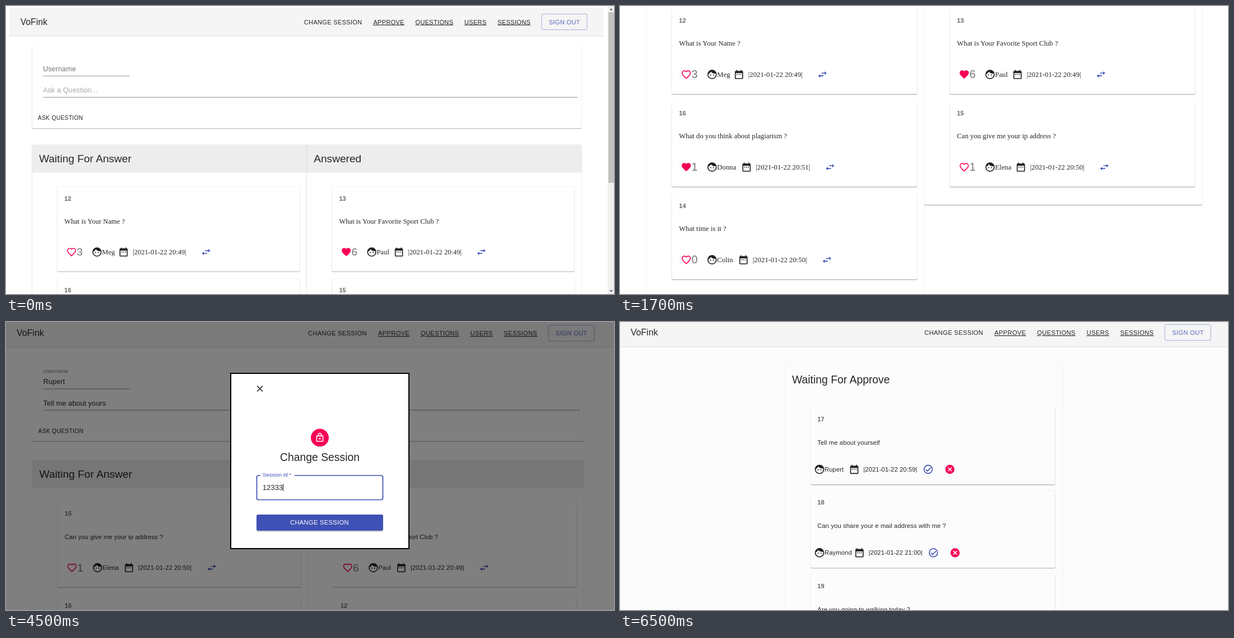
Recreate the animation shown at these times as an HTML page. Size 1085 by 516 pixels, loop 8 s.

```html
<!DOCTYPE html>
<html lang="en">
<head>
<meta charset="utf-8">
<title>Question board</title>
<style>
html, body { margin: 0; width: 100%; height: 100%; overflow: hidden; background: #fff; }
svg { display: block; width: 1085px; height: 516px; }
text { font-family: "Liberation Sans", Arial, sans-serif; fill: #262626; white-space: pre; }
.serif { font-family: "Liberation Serif", "Times New Roman", serif; font-size: 12.75px; }
.body { font-size: 11.2px; letter-spacing: .0107em; }
.input { font-size: 12.75px; letter-spacing: .0094em; }
.small { font-size: 9.57px; }
.button { font-size: 11.17px; letter-spacing: .0286em; }
.compact { font-size: 10.4px; letter-spacing: .0286em; }
.link { text-decoration: underline; }
.brand { font-size: 15.95px; }
.title { font-size: 19.35px; }
.number { font-size: 11.15px; font-weight: bold; }
</style>
</head>
<body>
<svg id="stage" viewBox="0 0 1085 516"></svg>
<script>
const INK = '#212121', GRAY = '#757575', BLUE = '#3f51b5', PINK = '#f50057';
const BRAND = 'VoFink';

const text = (x, y, cls, str, fill = '', extra = '') =>
  `<text x="${x}" y="${y}" class="${cls}" ${fill && `style="fill:${fill}"`} ${extra}>${str}</text>`;
const rect = (x, y, w, h, fill, extra = '') =>
  `<rect x="${x}" y="${y}" width="${w}" height="${h}" fill="${fill}" ${extra}/>`;
const group = (transform, ...parts) => `<g transform="${transform}">${parts.join('')}</g>`;
const line = (x1, x2, y) => rect(x1, y - .5, x2 - x1, 1, '#8f8f8f');

// Paper with a soft edge and a darker lower rim.
const paper = (x, y, w, h, fill = '#fff') =>
  rect(x - .7, y - .3, w + 1.4, h + 1.8, '#000', 'rx="3.5" opacity=".07"') +
  rect(x, y + 6, w, h - 4.8, '#b4b4b4', 'rx="3"') +
  rect(x, y, w, h, fill, 'rx="3"');

const HEART = 'M12 21.35l-1.45-1.32C5.4 15.36 2 12.28 2 8.5 2 5.42 4.42 3 7.5 3c1.74 0 3.41.81 4.5 2.09' +
  'C13.09 3.81 14.76 3 16.5 3 19.58 3 22 5.42 22 8.5c0 3.78-3.4 6.86-8.55 11.54z';
const stroke = (d, color) => `<path d="${d}" fill="none" stroke="${color}" stroke-width="2"/>`;
const disc = (r, attrs) => `<circle cx="12" cy="12" r="${r}" ${attrs}/>`;

const ICONS = {
  heart: `<path d="${HEART}" fill="${PINK}"/>`,
  heartLine: `<path d="${HEART}" transform="translate(1.2 1.2) scale(.9)" fill="none" stroke="${PINK}" stroke-width="2.2"/>`,
  face: disc(9, `fill="none" stroke="${INK}" stroke-width="2"`) +
    `<path d="M3.5 11.3C6.5 10.2 8.4 8.2 9.26 5.77 11.07 8.33 14.05 10 17.42 10c1 0 2-.1 3-.4C19 4 15 2.5 12 2.5S4 5 3.5 11.3z" fill="${INK}"/>` +
    `<g fill="${INK}"><circle cx="9" cy="13" r="1.3"/><circle cx="15" cy="13" r="1.3"/></g>`,
  calendar: `<path fill="${INK}" d="M9 11H7v2h2zm4 0h-2v2h2zm4 0h-2v2h2zm2-7h-1V2h-2v2H8V2H6v2H5Q3 4 3 6v14q0 2 2 2h14q2 0 2-2V6q0-2-2-2zm0 16H5V9h14z"/>`,
  swap: `<path fill="${BLUE}" d="M7 11l-4 4 4 4v-3h7v-2H7zM21 9l-4-4v3h-7v2h7v3z"/>`,
  check: disc(9, `fill="none" stroke="${BLUE}" stroke-width="2"`) + stroke('M6.7 12.3l3.6 3.6 7.3-7.4', BLUE),
  cancel: disc(10, `fill="${PINK}"`) + stroke('M8 8l8 8M16 8l-8 8', '#fff'),
  close: stroke('M5.8 5.8l12.4 12.4M18.2 5.8L5.8 18.2', INK),
  lock: stroke('M5 9h14v12H5zM8.9 9V6a3.1 3.1 0 0 1 6.2 0v3', '#fff') + disc(2, 'transform="translate(0 3)" fill="#fff"'),
};
const icon = (name, x, y, size = 19.6) =>
  group(`translate(${x - size / 2} ${y - size / 2}) scale(${size / 24})`, ICONS[name]);

// width: room the user name takes, which places everything after it
const question = (number, ask, likes, user, width, time) => ({ number, ask, likes, user, width, time });
const Q = {
  name: question(12, 'What is Your Name ?', 3, 'Meg', 23, '20:49'),
  club: question(13, 'What is Your Favorite Sport Club ?', 6, 'Paul', 24, '20:49'),
  clock: question(14, 'What time is it ?', 0, 'Colin', 31, '20:50'),
  address: question(15, 'Can you give me your ip address ?', 1, 'Elena', 30, '20:50'),
  copying: question(16, 'What do you think about plagiarism ?', 1, 'Donna', 36.5, '20:51'),
};
const liked = q => ({ ...q, liked: true });
const stamp = time => `|2021-01-22 ${time}|`;

function card(q, x, y, cls) {
  const end = x + 81 + q.width + (cls === 'body' ? 1.5 : 0);
  const row = y + 118.5;
  return paper(x, y, 438, 153.5) +
    text(x + 13, y + (cls === 'body' ? 24.5 : 26), 'number', q.number, '#666') +
    text(x + 13, y + 67, cls, q.ask) +
    icon(q.liked ? 'heart' : 'heartLine', x + 26, row) +
    text(x + 35.4, row + 6.7, 'title', q.likes, GRAY) +
    icon('face', x + 72, row, 20) +
    text(x + 81, row + 4, cls, q.user) +
    icon('calendar', end + 16, row) +
    text(end + 32.5, row + 4, cls, stamp(q.time)) +
    icon('swap', end + 165, row);
}

function column(x, title, list, cls) {
  return paper(x, 249.5, 496, 96 + 166 * list.length) +
    `<path d="M${x} 300v-48q0-3 3-3h490q3 0 3 3v48z" fill="#ededed"/>` +
    text(x + 12.6, 281, 'title', title) +
    list.map((q, i) => card(q, x + 45.3, 325.5 + 166 * i, cls)).join('');
}

const board = (waiting, answered, cls = 'serif') =>
  column(47, 'Waiting For Answer', waiting, cls) +
  column(543, 'Answered', answered, cls) +
  rect(542.5, 249, 1, 51, '#dedede');

const form = filled =>
  paper(47, 68, 992, 151.5) +
  (filled
    ? text(67, 95.5, 'small', 'Username', GRAY) + text(66.7, 116.5, 'input', 'Rupert') +
      text(66.7, 155.2, 'input', 'Tell me about yours')
    : text(66.7, 116, 'input', 'Username', GRAY) + text(66.7, 154.5, 'input', 'Ask a Question...', '#a6a6a6')) +
  line(67, 223.5, 125) + line(67, 1032, 163.5) +
  text(57.5, 204.8, 'compact', 'ASK QUESTION');

const LINKS = [['APPROVE', 663], ['QUESTIONS', 739], ['USERS', 827.5], ['SESSIONS', 887.5]];
const header = (left, right, shift = 0, nav = 0) =>
  rect(left, 1, right - left, 51, '#f5f5f5') + rect(left, 52, right - left, 1, '#dcdcdc') +
  text(26 + shift, 32.2, 'brand', BRAND) +
  group(`translate(${nav} 0)`,
    text(538, 31, 'button', 'CHANGE SESSION'),
    ...LINKS.map(([label, x]) => text(x, 31, 'button link', label)),
    rect(967, 12.5, 82, 28.5, 'none', 'rx="3" stroke="#a3abd8"'),
    text(980, 31, 'button', 'SIGN OUT', '#5a68bd'));

const scrollbar =
  rect(1073.5, 0, 11.5, 516, '#f1f1f1') + rect(1075, 11, 10, 306, '#c1c1c1') +
  '<path d="M1077 7.5l3-3.5 3 3.5zM1077 509l3 3.5 3-3.5z" fill="#606060"/>';

const dialog =
  rect(401, 92, 318, 314, '#fff', 'stroke="#000" stroke-width="2"') +
  icon('close', 453, 119.5, 19.2) +
  `<circle cx="560" cy="207.3" r="16" fill="${PINK}"/>` + icon('lock', 560, 206.5, 19.2) +
  text(560, 248.8, 'title', 'Change Session', '', 'text-anchor="middle"') +
  rect(447.5, 275, 225, 43.5, 'none', `rx="3" stroke="${BLUE}" stroke-width="1.7"`) +
  rect(454, 272, 61, 5, '#fff') +
  text(458, 277.3, 'small', 'Session Id *', BLUE) +
  text(458, 301, 'input', '12333') + rect(494, 290, 1, 13, '#111') +
  rect(447, 346, 226, 29.5, '#000', 'rx="3" opacity=".25"') +
  rect(447, 345, 226, 28.8, BLUE, 'rx="3"') +
  text(507, 363.3, 'button', 'CHANGE SESSION', '#fff');

function pending(number, ask, user, end, time, y) {
  const row = y + 112;
  return paper(340, y, 436.5, 139, '#fcfcfc') +
    text(352.3, y + 26, 'number', number, '#666') +
    text(352.3, y + 67.7, 'body', ask) +
    icon('face', 356, row, 20) + text(365, row + 3.8, 'body', user) +
    icon('calendar', end + 16, row) + text(end + 32.3, row + 3.8, 'body', stamp(time)) +
    icon('check', end + 148, row) + icon('cancel', end + 186.7, row);
}

const waiting = [Q.name, liked(Q.copying), Q.clock];
const answered = [liked(Q.club), Q.address];
const moved = [[Q.address, liked(Q.copying), Q.clock], [Q.club, Q.name]];

const scenes = [
  { until: 500, art: group('matrix(.9885 0 0 .9885 0 1.9)',
      header(6, 1078.5), form(false), board(waiting, answered)) + scrollbar },
  { until: 2500, art: group('translate(0 -321.3)', board(waiting, answered)) },
  { until: 4500, art: header(6, 1078.5) + form(true) + board(...moved) },
  { until: 6500, art:
      group('translate(0 -6.7)', header(0, 1085, -7, 1)) +
      group('matrix(.992 0 0 .9915 .4 -4.1)', form(true)) +
      group('matrix(.992 0 0 .9915 .4 0)', board(...moved, 'body')) +
      rect(0, 0, 1085, 516, '#000', 'opacity=".5"') + dialog },
  { until: 8000, art:
      rect(0, 0, 1085, 516, '#fbfbfb') +
      group('translate(0 -8)', header(0, 1085, -7, 5.3)) +
      paper(295, 78, 494, 520, '#fcfcfc') +
      text(307, 109.6, 'title', 'Waiting For Approve') +
      pending(17, 'Tell me about yourself', 'Rupert', 402, '20:59', 152) +
      pending(18, 'Can you share your e mail address with me ?', 'Raymond', 411.3, '21:00', 301.4) +
      pending(19, 'Are you going to walking today ?', '', 402, '21:01', 450.8) },
];

const stage = document.getElementById('stage');
stage.innerHTML = scenes.map(s => `<g>${s.art}</g>`).join('');
const layers = [...stage.children];

function draw(time) {
  const now = time % 8000;
  const current = scenes.findIndex(s => now < s.until);
  layers.forEach((layer, i) => layer.style.display = i === current ? '' : 'none');
}

const start = performance.now();
function tick() {
  draw(performance.now() - start);
  requestAnimationFrame(tick);
}
tick();
</script>
</body>
</html>
```
